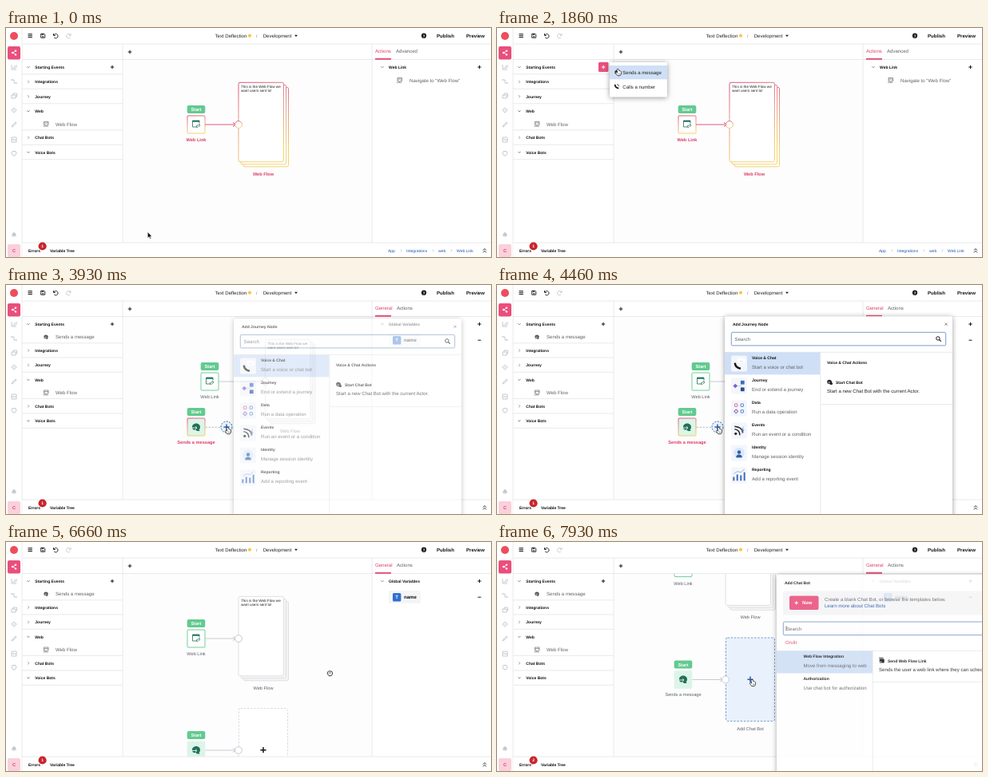
Animation, 607 px wide and 287 px high, one loop 8 s. Source, as an HTML page:

```html
<!DOCTYPE html>
<html lang="en">
<head>
<meta charset="utf-8">
<title>Flow builder</title>
<style>
html, body { margin: 0; width: 100%; height: 100%; overflow: hidden; background: #fff; }
svg { display: block; width: 100vw; height: 100vh; }
text { font: 6.07px "Liberation Sans", Arial, sans-serif; fill: #222; text-rendering: geometricPrecision; white-space: pre; }
.s { font-size: 5px; }
.n { font-size: 5.65px; }
.c { font-size: 4.6px; }
.b { font-weight: 700; fill: #111; }
.m { text-anchor: middle; }
.p { fill: #dc3f68; }
.g { fill: #5f6268; }
.w { fill: #fff; }
.u { fill: #2158a8; }
.sh { filter: drop-shadow(0 1px 3px rgba(0,0,0,.4)); }
</style>
</head>
<body>
<svg id="stage" viewBox="0 0 607 287" preserveAspectRatio="none"></svg>
<script>
const LOOP = 8000;
const PINK = '#e94f7c', GREEN = '#62ca90', DEEP = '#237058', BLUE = '#2b5fa9', RIM = '#5b83b8',
      LINE = '#e4e5e8', HOVER = '#cfdff6', TINT = '#e9f1fc', INK = '#161616', PALE = '#c6c8cd';

// ---- drawing helpers ----
const SIZE = { s: 5, n: 5.65, c: 4.6 };
const text = (x, y, str, cls = '') => {
  const key = cls.split(' ').find(k => SIZE[k]);
  return `<text x="${x}" y="${y + (SIZE[key] || 6) * .36}" class="${cls}">${str}</text>`;
};
const rect = (x, y, w, h, fill, r = 0, more = '') =>
  `<rect x="${x}" y="${y}" width="${w}" height="${h}" rx="${r}" fill="${fill}" ${more}/>`;
const circle = (x, y, r, fill, more = '') => `<circle cx="${x}" cy="${y}" r="${r}" fill="${fill}" ${more}/>`;
const path = (d, col = INK, w = 1, fill = 'none', more = '') =>
  `<path d="${d}" stroke="${col}" stroke-width="${w}" fill="${fill}" ${more}/>`;
const at = (x, y, body, k = 1) => `<g transform="translate(${x} ${y}) scale(${k})">${body}</g>`;
const hline = (x1, x2, y) => path(`M${x1} ${y}H${x2}`, LINE, .8);
const vline = (x, y1, y2) => path(`M${x} ${y1}V${y2}`, LINE, .8);
const plus = (x, y, r = 2.2, col = INK, w = 1) => path(`M${x - r} ${y}h${2 * r}M${x} ${y - r}v${2 * r}`, col, w);
const minus = (x, y) => path(`M${x - 2} ${y}h4`);
const down = (x, y) => path(`M${x - 1.6} ${y - .8}l1.6 1.6 1.6-1.6`, '#555', .7);
const right = (x, y, col = '#777') => path(`M${x - .8} ${y - 1.6}l1.6 1.6-1.6 1.6`, col, .7);
const chat = (x, y, col, k = 1) => at(x, y,
  path('M-5 0C-5-6 5-6 5 0C5 1.6 4.4 2.6 3.6 3.2L4.6 5H1L-.5 3.6H-3C-4.4 3-5 1.6-5 0Z', 'none', 0, col) +
  path('M-5 1H.6M-1-.8L1 1-1 2.8', '#e6f6ee', .9), k);
const frameIcon = (x, y, col = '#555') => at(x, y,
  path('M-2.5 0V-3H3V1H.5M-3.5 2.8H3M-2.5-1.4H3', col, .6) + path('M-3 .8H-1L.5 2.5', col, .8));
const lens = (x, y) => circle(x - .6, y - .6, 2.2, 'none', `stroke="${INK}"`) + path(`M${x + 1} ${y + 1}l2.2 2.2`, INK, 1.2);

// ---- timed groups: visible from a to b ----
const spans = [];
const during = (a, b, body) => {
  spans.push([a, b]);
  return `<g data-span="${spans.length - 1}">${body}</g>`;
};

// ---- fixed frame ----
const rail = () => {
  const icon = (y, d) => at(10, y, path(d, PALE, 1));
  return rect(0, 0, 20, 287, '#fff') + circle(10, 10, 5, '#ee4d5c') +
    rect(2, 23, 16, 16.5, PINK, 2) +
    at(10, 31, path('M-1 0L2-2.4M-1 0L2 2.4', '#fff', .8) + circle(-1.8, 0, 1.3, '#fff') + circle(2, -2.4, 1.2, '#fff') + circle(2, 2.4, 1.2, '#fff')) +
    icon(49, 'M-3-3V3H3M-1 2V0M1 2V-2M3 1V-3') + icon(67, 'M-3-2H0V2H3M-3-3V-1M3 1V3') +
    icon(85, 'M-3-1H2V3H-3ZM-1-1V-3H3.5V1H2') + icon(103, 'M-3 0L0-3 3 0 0 3ZM-1 0H1') +
    icon(121, 'M-3 3L-2 1 2-3 3-2-1 2Z') + icon(140, 'M-3-3H3V3H-3ZM-3 1L-1-1 1 1 3-1') +
    icon(157, 'M-2-2.5H2L3 0 1 3H-1L-3 0Z') +
    at(10, 259, path('M-2.6 1.6L-1.8-1C-1.6-3 1.6-3 1.8-1L2.6 1.6ZM-.8 2.6H.8', PALE, .6, PALE)) +
    rect(2, 271, 16, 16, '#fad0db', 2) + text(10, 279, 'C', 'n b p m') + vline(20, 0, 287);
};

const topBar = () => rect(20, 0, 587, 19.6, '#fff') + hline(20, 607, 20) +
  path('M27.5 7.7h5.4M27.5 9.7h5.4M27.5 11.7h5.4') +
  path('M43.7 7.2h4l1 1v4h-5z', INK, .9) + rect(44.7, 7.4, 2.4, 1.4, INK) + circle(46.2, 10.8, .9, INK) +
  path('M59.5 7v2.4h2.4M59.8 9.2a2.7 2.7 0 1 1 .4 2.6', INK, .9) +
  path('M81 7v2.4h-2.4M80.7 9.2a2.7 2.7 0 1 0-.4 2.6', PALE, .9) +
  text(261.5, 9.7, 'Text Deflection') + circle(305, 9.7, 2.1, '#f7c948') + text(313, 9.7, '/', 's g') +
  text(321.7, 9.7, 'Development') + path('M361 8.7h4l-2 2.4z', 'none', 0, INK) +
  circle(523, 9.7, 3.1, INK) + text(523, 9.8, '?', 's b w m') +
  text(539, 9.7, 'Publish', 'b') + text(576, 9.7, 'Preview', 'b');

const crumbs = (items, seps) => items.map(([x, s]) => text(x, 279, s, 's u')).join('') +
  seps.map(x => right(x, 279, '#bbb')).join('');

const bottomBar = () => rect(20.4, 269, 587, 18, '#fff') + hline(20, 607, 269) +
  text(28, 279, 'Errors', 's b') + text(55, 279, 'Variable Tree', 's b') +
  circle(45.6, 273.5, 5.1, '#c9252d') +
  during(0, 6800, text(45.6, 273.5, '1', 's b w m')) + during(6800, LOOP, text(45.6, 273.5, '2', 's b w m')) +
  during(0, 2000, crumbs([[478, 'App'], [501, 'Integrations'], [541, 'web'], [564, 'Web Link']], [494.5, 534.5, 557.5])) +
  during(2000, 3930, crumbs([[474.5, 'App'], [497, 'Starting Events'], [545, 'Sends a message']], [490.5, 538.5])) +
  path('M597 278.6l2-2 2 2M597 281.4l2-2 2 2', INK, .9);

// ---- sidebar ----
const sideRows = shift => {
  const row = (y, s, open) => (open ? down : right)(28, y + shift) + text(36.3, y + shift, s, 's b');
  return row(67.4, 'Integrations') + row(85.8, 'Journey') + row(104.2, 'Web', 1) +
    frameIcon(50, 120.4 + shift) + text(62, 120.4 + shift, 'Web Flow', 'g') +
    row(137.3, 'Chat Bots') + row(155.7, 'Voice Bots', 1) +
    [76.3, 94.7, 127.8, 146.3, 164.7].map(y => hline(20, 146, y + shift)).join('');
};

const sidebar = () => rect(20.4, 20.4, 125.6, 249, '#fff') + hline(20, 458, 39.5) + vline(146, 20, 269) +
  down(28, 49) + text(36.3, 49, 'Starting Events', 's b') + plus(133, 49) +
  during(0, 2000, hline(20, 146, 57.8) + sideRows(0)) +
  during(2000, LOOP, sideRows(14.6)) +
  during(2000, 3930, rect(20.7, 58, 124, 14, HOVER, 0, `stroke="${BLUE}" stroke-width="1.2"`) +
    chat(50, 65, PINK, .55) + path('M134 63.2h4M135 62.4h2', INK, .8) + rect(134.4, 64, 3.2, 3.8, INK, .5)) +
  during(3930, LOOP, hline(20, 146, 72.8) + chat(50, 65, '#555', .55)) +
  during(2000, LOOP, text(62, 65, 'Sends a message', 'g')) +
  during(1060, 2000, rect(127, 42.7, 12.4, 12.4, PINK, 1.5) + plus(133.2, 49, 2.2, '#fff'));

// ---- canvas ----
const pill = (x, y) => rect(x - 11.3, y - 5.1, 22.6, 10.2, GREEN, 2) + text(x, y, 'Start', 'n b w m');
const box = (x, y, fill, stroke) => rect(x - 11, y - 11, 22, 22, fill, 1, `stroke="${stroke}" stroke-width=".9"`);
const edge = (x1, x2, y, col) => path(`M${x1} ${y}H${x2}M${x2 - 3.5} ${y - 2.6}L${x2} ${y}L${x2 - 3.5} ${y + 2.6}`, col, .9);
const port = (x, y, col) => circle(x, y, 4.4, '#fff', `stroke="${col}" stroke-width=".8"`);

const webNodes = (on, x, cx) => {
  const line = on ? 'url(#sel)' : '#dcdde0', cls = on ? 'n b p m' : 'n g m';
  const card = (d, fill) => rect(cx + d, 68.3 + d, 56.5, 99.5, fill, 2, `stroke="${line}" stroke-width=".9"`);
  const back = on ? '#fff' : '#f5f5f6';
  return pill(x, 102) + box(x, 121, '#fff', on ? 'url(#sel)' : GREEN) +
    at(x, 120.5, path('M4-.8V-4.5H-4.5V3.5H0', DEEP, .8) + path('M-4.5-3.6H4', DEEP, 1.6) +
      path('M.8 3.2L3.4 .6M1.4 1.2l-1.2 1.4q0 2.2 2 1.6M3 3.6l1.6-1.8q.4-1.8-1.6-1.6', DEEP, .8)) +
    text(x, 140, 'Web Link', cls) + card(6, back) + card(3, back) + card(0, '#fff') +
    text(cx + 3, 73.5, 'This is the Web Flow we', 'c') + text(cx + 3, 78.8, 'want users sent to!', 'c') +
    edge(x + 11, cx - 3.5, 121, on ? '#e0446e' : '#c3c6cf') + port(cx, 121, on ? 'url(#sel)' : '#b9bbc4') +
    text(cx + 31, 182.5, 'Web Flow', cls);
};

const addButton = on => circle(276, 178, 7, on ? TINT : '#fff',
    on ? `stroke="${BLUE}" stroke-width=".9" stroke-dasharray="2.2 1.4"` : 'stroke="#d6d8dd" stroke-width=".8"') +
  plus(276, 178, 3.6, on ? BLUE : INK, 1.5);

const slot = on => rect(291.5, 208.5, 61, 104.5, on ? TINT : '#fff', 2,
    `stroke="${on ? RIM : '#cfd1d6'}" stroke-width=".8" stroke-dasharray="2.4 1.8"`) +
  plus(322, 260.7, 3.6, on ? BLUE : INK, 1.5) + port(291, 261, '#b9bfcc');

const canvas = () => `<g clip-path="url(#area)"><g id="pan">` +
  during(0, 2000, webNodes(true, 238, 291)) +
  during(2000, 6000, webNodes(false, 255, 324.5) +
    pill(238, 159) + box(238, 178, '#dcf5e8', 'url(#sel)') + chat(238, 178, DEEP) +
    path('M249.5 178.3H269', '#aeb3bf', .9, 'none', 'stroke-dasharray="2.4 1.6"') + text(238, 197.3, 'Sends a message', 'n b p m')) +
  during(2000, 3400, addButton(false)) + during(3400, 6000, addButton(true)) +
  during(6000, LOOP, webNodes(false, 238, 291) + pill(238, 242) + rect(226.7, 249.7, 22.6, 22.6, '#dcf5e8', 1) +
    chat(238, 260.5, DEEP) + text(238, 279.7, 'Sends a message', 'n g m') + edge(249.5, 287.5, 261, '#c3c6cf') +
    text(322, 322.7, 'Add Chat Bot', 'n g m')) +
  during(6000, 7460, slot(false)) + during(7460, LOOP, slot(true)) +
  '</g></g>' + plus(155, 30, 2.3);

// ---- right panel ----
const tabs = (a, b, x) => text(462, 28.8, a, 'p') + text(x, 28.8, b, 'g') + rect(462, 37.8, 20, 2, PINK);
const section = (y, s) => down(471, y) + text(479, y, s, 's b') + plus(592.5, y);

const panel = () => rect(458, 20.4, 149, 248.5, '#fff') + vline(458, 20, 269) + hline(458, 607, 39.5) +
  during(0, 2000, tabs('Actions', 'Advanced', 488) + section(49, 'Web Link') +
    frameIcon(492.5, 65.5) + text(505, 65.5, 'Navigate to "Web Flow"', 'g')) +
  during(2000, 3930, circle(467.5, 29, 3.5, INK) + path('M465.6 29h3.4M467.6 27.4l1.6 1.6-1.6 1.6', '#fff', .8) +
    text(476, 29, 'Sends a message') + section(48, 'Invoke') + text(479, 67, 'No actions', 'g')) +
  during(3930, LOOP, tabs('General', 'Actions', 489) + section(49, 'Global Variables') +
    rect(479, 61, 40, 16, '#f4f5f7', 1.5) + rect(484, 64, 10.4, 10.4, '#2f6fd0', 1.5) +
    text(489.2, 69.2, 'T', 'b w m') + text(498, 69, 'name', 'b') + minus(592.5, 69.2));

// ---- popups ----
const menu = () => during(1460, 2000, rect(141, 43, 72, 43.5, '#fff', 1, 'class="sh"') +
  during(1730, 2000, rect(141, 47, 72, 17.3, HOVER)) + chat(150, 55.5, '#222', .55) +
  text(157.3, 55.7, 'Sends a message') + at(150, 73.2, path('M-2.4-2.4Q-2.2 2 2.4 2.4', INK, 1.7) + path('M0-2.6Q2.6-2.4 2.6 0', INK, .7)) +
  text(157.3, 73.5, 'Calls a number'));

const art = [
  path('M-2-7H8V-1H4L2 1V-1H-2Z', 'none', 0, '#fff') + text(3, -4.5, '...', 's u m') + path('M-5.5-1Q-5 5.5 2 6.5', INK, 2.6),
  path('M-5-3L-2 0-5 3-8 0Z', 'none', 0, '#8260c9') + path('M-2 0H4', '#a9b6d6', .6) + rect(2, -7, 5, 5, '#3d6cc0') + rect(2, 2, 5, 5, '#2d4a8c'),
  circle(-4, -4, 2, 'none', 'stroke="#d9709c" stroke-width="1.1"') + circle(4, -4, 2, 'none', 'stroke="#5b86cf" stroke-width="1.1"') +
    path('M-4 1.5L-1.5 4-4 6.5-6.5 4Z', '#8a6cc4', 1.1) + circle(4, 4, 2, 'none', 'stroke="#5b86cf" stroke-width="1.1"'),
  path('M-6-2Q1-1 1 6M-6-5.5Q4-5 5 3', '#222', 1.5) + circle(-4.5, 4, 1.7, '#222') + path('M6-6L3 0H5L3 5 7-1H5Z', 'none', 0, '#5b86cf'),
  circle(0, 0, 7, '#dbe6f8') + circle(0, -1, 2.3, BLUE) + path('M-4 6Q-4 2 0 2T4 6Z', 'none', 0, BLUE),
  path('M-7 7V2M-2.4 7V-1M2.4 7V0M7 7V-4', '#3767b8', 2) + path('M-7-2L-2.4-5 2.4-4 7-8', '#7ba0dc', .8)
];
const kinds = [['Voice &amp; Chat', 'Start a voice or chat bot'], ['Journey', 'End or extend a journey'],
  ['Data', 'Run a data operation'], ['Events', 'Run an event or a condition'],
  ['Identity', 'Manage session identity'], ['Reporting', 'Add a reporting event']];

const field = (x, y, w, on) => rect(x, y, w, 16.6, '#fff', 1.5, `stroke="${on ? RIM : '#dcdee3'}" stroke-width=".8"`);

const nodeDialog = () => `<g id="nodes">` + rect(285, 39.3, 285, 260, '#fff', 1.5, 'class="sh"') +
  text(295, 49.4, 'Add Journey Node', 's b') + path('M560.5 47.7l3 3m0-3l-3 3', '#555', .7) +
  during(0, 5330, field(293.3, 59.3, 268.4, true)) + during(5330, LOOP, field(293.3, 59.3, 268.4, false)) +
  text(297.6, 67.6, 'Search', 'g') + lens(552.5, 67.5) +
  hline(285, 570, 84.3) + rect(285, 84.3, 119.5, 28, HOVER) +
  during(5330, LOOP, rect(405, 110.3, 165, 39.4, '#e6f0fb')) + vline(404.8, 84, 287) + hline(405, 570, 149.6) +
  kinds.map(([a, b], i) => rect(293, 88.5 + 28 * i, 20, 20, '#f3f6fb', 2) + at(303, 98.5 + 28 * i, art[i], .95) +
    text(319, 91.5 + 28 * i, a, 's b') + text(319, 102.6 + 28 * i, b, 'g')).join('') +
  text(413, 97.3, 'Voice &amp; Chat Actions', 's b') +
  chat(416, 121.5, '#222', .6) + circle(418.5, 123.5, 1.6, '#222') +
  text(424, 122.2, 'Start Chat Bot', 's b') + text(413, 133, 'Start a new Chat Bot with the current Actor.') + '</g>';

const botDialog = () => `<g id="bots">` + rect(350, 41, 285, 260, '#fff', 1.5, 'class="sh"') +
  text(360, 51, 'Add Chat Bot', 's b') + rect(358, 61.5, 260, 30, '#f5f5f7', 1.5) +
  rect(366, 67.5, 36.5, 17.5, PINK, 2) + plus(374.7, 76.3, 2.3, '#fff') + text(382, 76.3, 'New', 'b w') +
  text(410, 72.2, 'Create a blank Chat Bot, or browse the templates below.', 'g') +
  text(410, 80.2, 'Learn more about Chat Bots', 'u') +
  field(358.3, 100, 268, true) + path('M362 105.3v6', INK, .6) + text(362, 108.4, 'Search', 'g') +
  text(361, 125.6, 'Orvilt', 'p') + hline(350, 607, 136.5) + rect(350, 136.5, 120, 28, HOVER) + vline(470.3, 136, 287) +
  text(383.5, 143.5, 'Web Flow Integration', 's b') + text(383.5, 154.6, 'Move from messaging to web', 'g') +
  text(383.5, 171.4, 'Authorization', 's b') + text(383.5, 182.5, 'Use chat bot for authorization', 'g') +
  at(481.5, 148.5, rect(-2.8, -2, 6, 5, INK, .8) + path('M-3.4-3.2H2', INK, .9) + path('M-3 1.6H0', '#fff', .8)) +
  text(489, 149, 'Send Web Flow Link', 's b') +
  text(478, 159.5, 'Sends the user a web link where they can schedule') + hline(470, 607, 175.5) + '</g>';

// ---- pointer ----
const pointers = {
  arrow: path('M0 0V7.4L1.8 5.8 3 8.4 4.2 7.9 3 5.4H5.3Z', '#fff', .5, '#000'),
  hand: path('M-1.6-4Q-.8-4.6 0-3.8L.9-1.8Q2-2.4 2.4-1.4Q3.6-1.4 3.6 0L3.4 2.4 2.2 4.2H-1.2L-3.6 1Q-3.8-.2-2.4 0L-1.4 .6-2-3Z', '#222', .8, '#fff') +
    path('M.4 1.2V2.8M1.9 1.2V2.8', '#222', .5),
  grab: path('M-2.6-1.8Q-1.8-3.2-.8-2.5Q.4-3.2 1.2-2.3Q2.8-2.6 3-1L2.8 1.4 1.6 3.2H-1.4L-3.2 .8V-.4Z', '#222', .9, '#fff') +
    path('M-.8-2V-.4M1-1.9V-.4M-2 .4H1', '#222', .5)
};

document.getElementById('stage').innerHTML =
  `<defs><linearGradient id="sel" x1="0" y1="0" x2=".25" y2="1"><stop stop-color="#dc3d6c"/><stop offset=".45" stop-color="#e58a83"/>
   <stop offset="1" stop-color="#f0cf5e"/></linearGradient>
   <clipPath id="area"><rect x="146.5" y="40" width="311.5" height="229"/></clipPath></defs>` +
  rect(0, 0, 607, 287, '#fff') + rect(146.4, 40, 312, 229, '#fdfdfd') +
  canvas() + sidebar() + panel() + topBar() + rail() + bottomBar() + menu() + nodeDialog() + botDialog() +
  '<g id="pointer">' + Object.keys(pointers).map(k => `<g id="${k}">${pointers[k]}</g>`).join('') + '</g>';

// ---- motion: each row holds until the next ----
const moves = [
  [0, 177.3, 255.8, 'arrow'], [400, 172, 238, 'arrow'], [530, 161, 192, 'arrow'], [800, 149, 134, 'arrow'],
  [930, 139, 78, 'arrow'], [1060, 134, 53, 'hand'], [1730, 143, 54, 'hand'], [1860, 152, 55.5, 'hand'],
  [2130, 130, 60, 'hand'], [2260, 112, 63.5, 'hand'], [2400, 118, 67, 'hand'], [2530, 140, 82, 'hand'],
  [2660, 167, 104, 'hand'], [2730, 192, 122, 'hand'], [2860, 223, 149, 'hand'], [3000, 243, 193.5, 'hand'],
  [3130, 256, 188, 'hand'], [3260, 269, 183, 'hand'], [3400, 278, 182.5, 'hand'], [4730, 302, 171, 'hand'],
  [4860, 345, 159, 'hand'], [5000, 381, 151, 'hand'], [5130, 402, 146, 'hand'], [5330, 420, 144, 'hand'],
  [5460, 425, 143.5, 'hand'], [6000, 416, 153, 'hand'], [6130, 405.5, 164.5, 'hand'], [6530, 405.5, 164.5, 'grab'],
  [6800, 404, 140, 'grab'], [6930, 402, 105, 'grab'], [7060, 400.5, 76, 'grab'], [7200, 381, 102, 'hand'],
  [7330, 346, 146, 'hand'], [7460, 323, 172, 'hand'], [7600, 320, 176.5, 'hand']
];
const pans = [[0, 0, 0], [6800, -1.5, -24.5], [6930, -3.5, -59.5], [7060, -5, -88.5]];
const nodesFade = [[0, 0, 0], [3930, .6, 3], [4060, 1, 0], [6000, .35, 0], [6130, 0, 0]];
const botsFade = [[0, 0, 0], [7860, .5, 4], [7930, .88, 0]];

const step = (rows, t) => rows.filter(r => r[0] <= t).pop();
const el = id => document.getElementById(id);
const show = (node, on) => node.setAttribute('display', on ? 'inline' : 'none');
const move = (node, x, y) => node.setAttribute('transform', `translate(${x} ${y})`);
const timed = [...document.querySelectorAll('[data-span]')].map(node => [node, ...spans[node.dataset.span]]);

function fade(id, rows, t) {
  const [, alpha, dy] = step(rows, t), node = el(id);
  show(node, alpha > 0);
  node.setAttribute('opacity', alpha);
  move(node, 0, dy);
}

function draw(t) {
  for (const [node, a, b] of timed) show(node, t >= a && t < b);
  const [, px, py] = step(pans, t);
  move(el('pan'), px, py);
  fade('nodes', nodesFade, t);
  fade('bots', botsFade, t);
  const [, x, y, kind] = step(moves, t);
  move(el('pointer'), x, y);
  for (const k in pointers) show(el(k), k === kind);
}

const start = performance.now();
function tick() {
  draw((performance.now() - start) % LOOP);
  requestAnimationFrame(tick);
}
tick();
</script>
</body>
</html>
```
